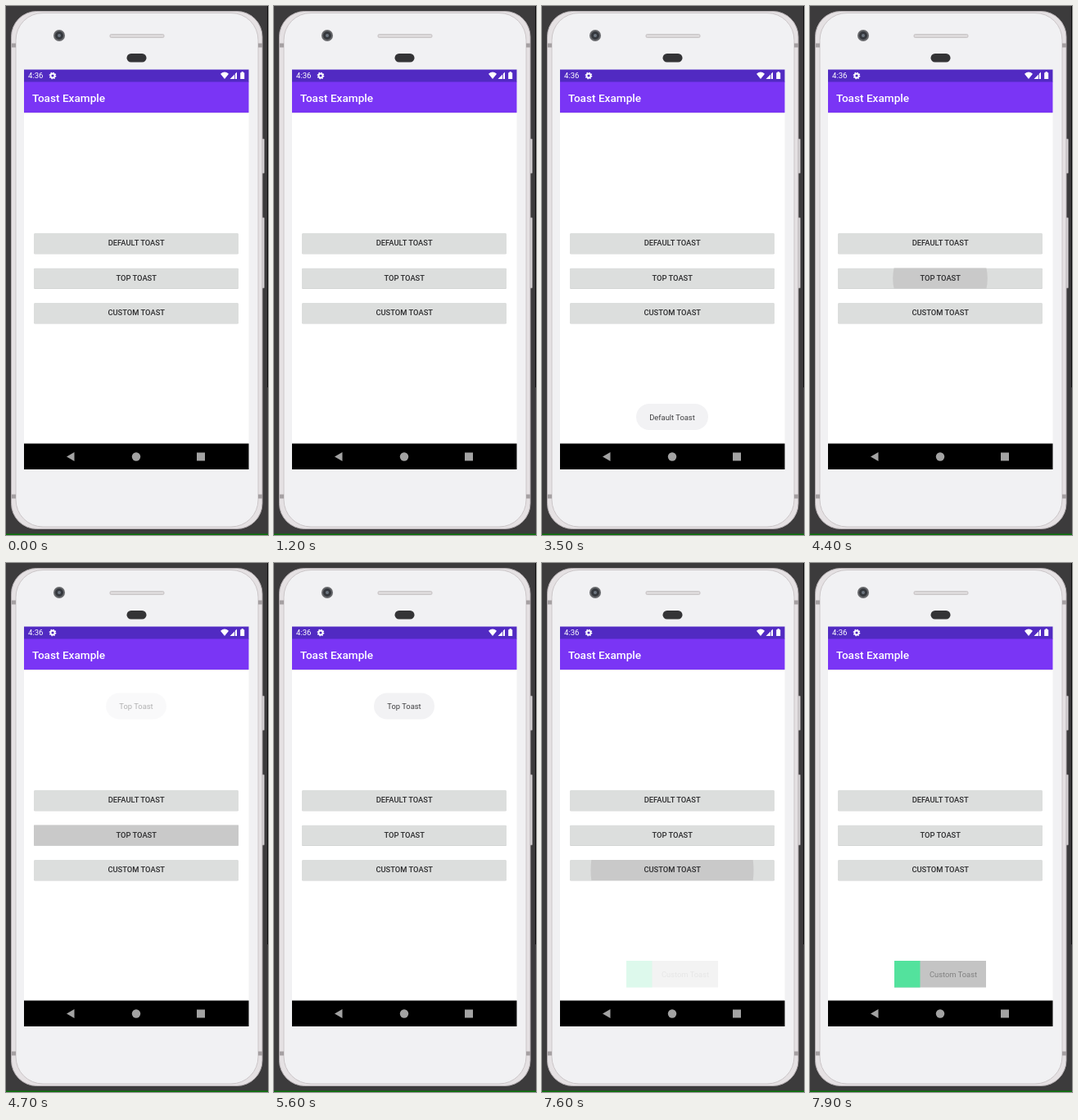
An HTML page for the animation above (8 s loop, 320 by 645 pixels).

```html
<!DOCTYPE html>
<html lang="en">
<head>
<meta charset="utf-8">
<title>Toast Example</title>
<style>
  html, body { margin: 0; width: 100%; height: 100%; overflow: hidden; background: #3c3b3c; }
  svg { display: block; }
  text { font: 9.37px Roboto, sans-serif; }
  .medium { font-weight: 500; }
  .middle { text-anchor: middle; }
</style>
</head>
<body>
<svg id="stage" width="320" height="645" viewBox="0 0 320 645">
  <rect width="320" height="645" fill="#3c3b3c"/>
  <rect x="319" width="1" height="465" fill="#0c0c0c"/>
  <rect y="643.5" width="320" height="1.5" fill="#087408"/>

  <!-- Phone body -->
  <g fill="#d9d6d8" stroke="#8e898b" stroke-width=".6">
    <rect x="311" y="162" width="4.5" height="42" rx="1"/>
    <rect x="311" y="258" width="4.5" height="86" rx="1"/>
  </g>
  <rect x="6.5" y="6.5" width="306.5" height="631" rx="31" fill="#e5e1e3" stroke="#b5afb2"/>
  <rect x="12" y="8.5" width="296" height="626.5" rx="33" fill="#f1f1f3" stroke="#cbc6c8"/>
  <path d="M7 48h5M308 48h5M7 598h5M308 598h5" stroke="#a5a0a2" stroke-width="5"/>
  <circle cx="65" cy="36" r="7" fill="#66676a"/>
  <circle cx="65" cy="36" r="5" fill="#35383d"/>
  <circle cx="65" cy="36" r="2" fill="#6d7680"/>
  <rect x="127" y="34.5" width="66" height="4" rx="1.5" fill="#dddadb" stroke="#bbb6b8" stroke-width=".7"/>
  <rect x="147.5" y="58" width="24" height="10.5" rx="5.2" fill="#343436"/>

  <!-- Screen -->
  <rect x="22" y="77.5" width="274.5" height="487.5" fill="#fff"/>
  <rect x="22" y="130" width="274.5" height="1" fill="#ececf0"/>
  <rect x="22" y="92" width="274.5" height="38" fill="#7a35f5"/>
  <rect x="22" y="77.5" width="274.5" height="15" fill="#512ac2"/>
  <text class="medium" x="32" y="116.6" fill="#fff" style="font-size:13.6px">Toast Example</text>
  <text x="27" y="88.3" fill="#fff" style="font-size:9.6px">4:36</text>
  <g fill="none" stroke="#fff">
    <circle cx="57" cy="85" r="2.5" stroke-width="1.8"/>
    <circle cx="57" cy="85" r="3.6" stroke-width="1.5" stroke-dasharray="1.41"/>
  </g>
  <path d="M262 82.8Q267 78.4 272 82.8L267 89ZM282 80.5V89H273.5ZM286.2 81.2H287.6V80H289.8V81.2H291.2V89H286.2Z" fill="#fff"/>
  <path d="M279.5 83V89" stroke="#512ac2" stroke-width=".8"/>

  <rect x="22" y="533.5" width="274.5" height="31.5" fill="#000"/>
  <path d="M83.5 544V555L74 549.5ZM233 544.5H243V554.5H233Z" fill="#a3a3a3"/>
  <circle cx="159" cy="549.5" r="5.2" fill="#a3a3a3"/>

  <g id="buttons"></g>

  <g id="defaultToast">
    <rect x="115" y="485" width="88" height="32" rx="16" fill="#f2f2f4"/>
    <text class="middle" x="159" y="504.5" fill="#3e3e40">Default Toast</text>
  </g>
  <g id="topToast">
    <rect x="122" y="158.5" width="74" height="32" rx="16" fill="#f2f2f4"/>
    <text class="middle" x="159" y="178" fill="#3e3e40">Top Toast</text>
  </g>
  <g id="customToast">
    <rect x="103" y="485" width="112" height="32.5" fill="#b0b0b0"/>
    <rect x="103" y="485" width="31.5" height="32.5" fill="#18d87c"/>
    <text class="middle" x="175" y="504.5" fill="#565656">Custom Toast</text>
  </g>
</svg>
<script>
const LOOP = 8000, FADE = 500;
const byId = id => document.getElementById(id);
const clamp = v => Math.min(1, Math.max(0, v));

const buttons = [
  { label: 'DEFAULT TOAST', y: 277, press: 1450, release: 1700 },
  { label: 'TOP TOAST', y: 319.5, press: 4350, release: 4750 },
  { label: 'CUSTOM TOAST', y: 362, press: 7450, release: 7650 }
];
const toasts = [
  { node: byId('defaultToast'), show: 1680, hide: 3900 },
  { node: byId('topToast'), show: 4500, hide: 6620 },
  { node: byId('customToast'), show: 7530, hide: LOOP }
];

byId('buttons').innerHTML = buttons.map(({ label, y }) => `
  <rect x="34" y="${y + 0.6}" width="250" height="25" rx="1.5" fill="#d0d1d1"/>
  <svg x="34" y="${y}" width="250" height="25">
    <rect width="250" height="25" rx="1.5" fill="#dcdedd"/>
    <circle class="ripple" cx="125" cy="12.5" fill="#c9c9c9"/>
  </svg>
  <text class="medium middle" x="159.2" y="${y + 15.3}" fill="#2b2b2d">${label}</text>`).join('');
const ripples = document.querySelectorAll('.ripple');

function draw(t) {
  buttons.forEach(({ press, release }, i) => {
    const grow = clamp((t - press) / 250);
    ripples[i].setAttribute('r', 128 * Math.sqrt(grow));
    ripples[i].setAttribute('opacity', grow > 0 ? 1 - clamp((t - release) / 220) : 0);
  });
  for (const { node, show, hide } of toasts) {
    const opacity = clamp((t - show) / FADE) * (1 - clamp((t - hide) / FADE));
    node.setAttribute('opacity', opacity);
  }
}

const start = performance.now();
function tick() {
  draw((performance.now() - start) % LOOP);
  requestAnimationFrame(tick);
}
tick();
</script>
</body>
</html>
```
